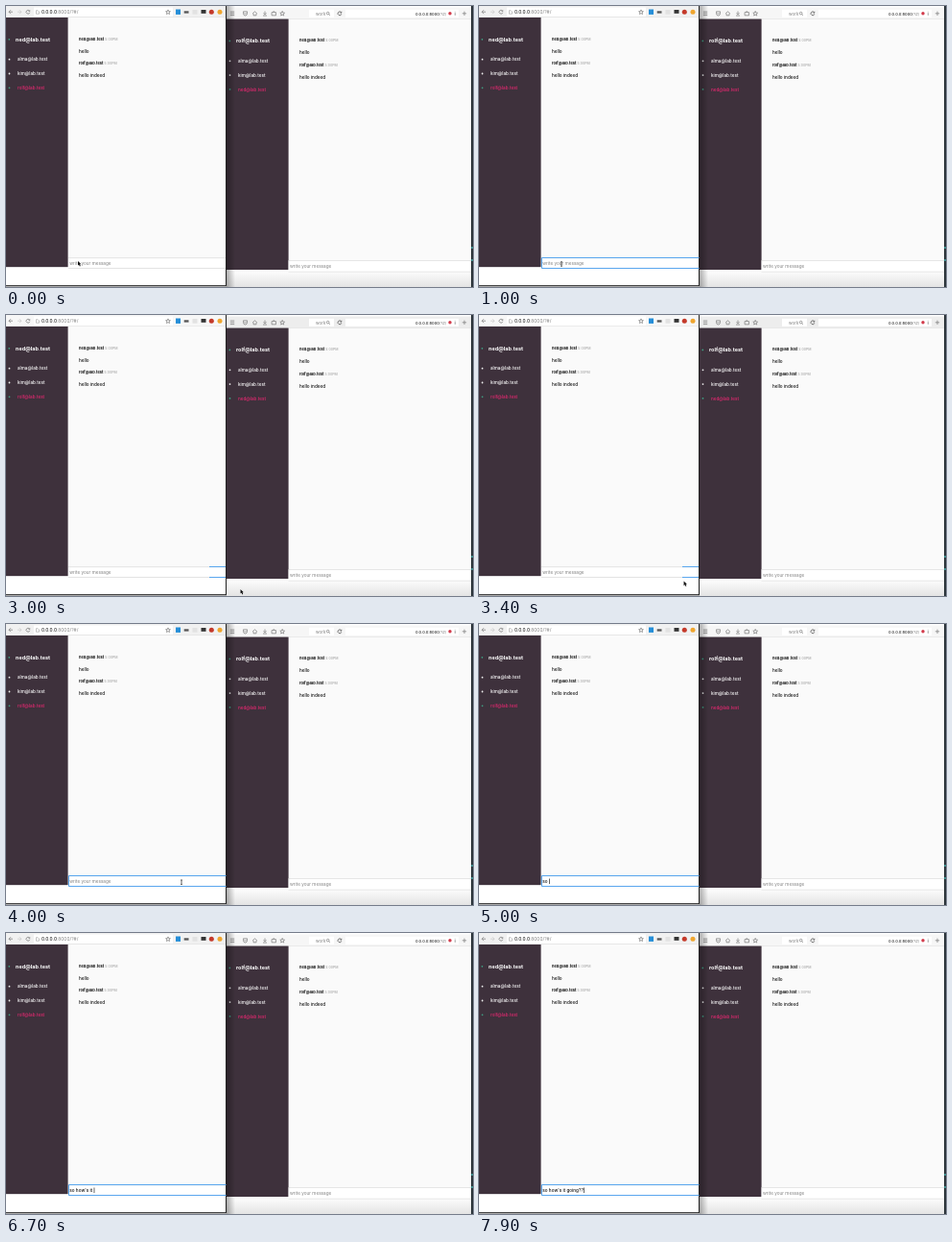
An HTML page with a canvas for the animation above (8000 ms loop, 487 by 293 pixels).

```html
<!DOCTYPE html>
<html lang="en">
<head>
<meta charset="utf-8">
<title>Chat in two windows</title>
<style>
html, body { margin: 0; width: 100%; height: 100%; overflow: hidden; background: #fff; }
canvas { display: block; width: 487px; height: 293px; }
</style>
</head>
<body>
<canvas id="stage"></canvas>
<script>
const W = 487, H = 293, LOOP = 8000;
const canvas = document.getElementById('stage');
const ratio = window.devicePixelRatio || 1;
canvas.width = W * ratio;
canvas.height = H * ratio;
const ctx = canvas.getContext('2d');
ctx.scale(ratio, ratio);

const DARK = '#3e313c', PINK = '#e52870', GREEN = '#3f9c80', GREY = '#808080', BLUE = '#5aa7ee';
const MESSAGE = "so how's it going??";
const KEY_TIMES = [4500, 4650, 4850, 5400, 5500, 5650, 5800, 5900, 6000, 6100,
  6200, 6600, 6900, 7050, 7200, 7300, 7400, 7600, 7800];
// Pointer stops: time, x, y
const PATH = [[0, 75, 266], [300, 75, 267], [500, 86, 269], [1900, 86, 269],
  [2250, 197, 280.5], [2400, 197, 280.5], [2800, 244.5, 286], [3150, 244.5, 286], [3650, 183, 269.2]];
const NED = 'ned@lab.test', ROLF = 'rolf@lab.test';

function rect(x, y, w, h, color) {
  ctx.fillStyle = color;
  ctx.fillRect(x, y, w, h);
}

function fade(x, y, w, h, from, to, vertical) {
  const gradient = ctx.createLinearGradient(x, y, vertical ? x : x + w, vertical ? y + h : y);
  gradient.addColorStop(0, from);
  gradient.addColorStop(1, to);
  rect(x, y, w, h, gradient);
}

// Laid out ten times larger and scaled down, so small letters keep their true spacing.
function text(str, x, y, size, color, weight = 400) {
  ctx.save();
  ctx.translate(x, y);
  ctx.scale(0.1, 0.1);
  ctx.font = `${weight} ${size * 10}px Inter, sans-serif`;
  ctx.fillStyle = color;
  ctx.fillText(str, 0, 0);
  const width = ctx.measureText(str).width / 10;
  ctx.restore();
  return width;
}

function dot(x, y, r, color) {
  ctx.fillStyle = color;
  ctx.beginPath();
  ctx.arc(x, y, r, 0, 7);
  ctx.fill();
}

function stroke(path, x, y, color = '#777', width = 0.7) {
  ctx.save();
  ctx.translate(x, y);
  ctx.strokeStyle = color;
  ctx.lineWidth = width;
  ctx.stroke(new Path2D(path));
  ctx.restore();
}

const STAR = 'M0-2.4L.7-.7 2.4-.6 1.1.5 1.5 2.2 0 1.3-1.5 2.2-1.1.5-2.4-.6-.7-.7Z';
const RELOAD = 'M1.5-1.1A1.9 1.9 0 1 0 1.8.5M1.8-2V-.7H.5';

function chat(x, y, bottom, owner, other) {
  rect(x, y, 64.6, bottom - y, DARK);
  dot(x + 3.3, y + 22.8, 0.9, GREEN);
  text(owner, x + 10, y + 24.7, 5.5, '#fff', 700);
  ['alma@lab.test', 'kim@lab.test', other].forEach((name, i) => {
    const rowY = y + 43.7 + i * 14.8;
    dot(x + 3.5, rowY, 0.9, i < 2 ? '#eee' : GREEN);
    text(name, x + 12, rowY + 1.7, 4.6, i < 2 ? '#fff' : PINK, 500);
  });
  [[NED, 'hello'], [ROLF, 'hello indeed']].forEach(([name, line], i) => {
    const rowY = y + 23.7 + i * 25.5;
    const width = text(name, x + 76, rowY, 4, '#111', 700);
    text('5:00PM', x + 77 + width, rowY, 3.6, '#999');
    text(line, x + 76, rowY + 13, 4.65, '#111', 500);
  });
}

function leftWindow(active) {
  if (active) fade(230, 0, 9, H, 'rgba(0,0,0,.3)', 'rgba(0,0,0,0)');
  rect(0, 0, 229, 12, active ? '#f1f1f1' : '#f7f7f7');
  rect(29, 1.5, 145, 9.5, '#fff');
  rect(0, 11.7, 229, 0.6, '#ccc');
  stroke('M2 0H-2M0-2L-2 0 0 2', 5, 6.2);
  stroke('M-2 0H2M0-2L2 0 0 2', 14, 6.2, '#c8c8c8');
  stroke(RELOAD, 23, 6.2);
  stroke('M-1.5-1.5H.2L1.5-.2V2H-1.5Z', 33, 6.2, '#888', 0.5);
  const width = text('0.0.0.0', 37, 8, 4.8, '#222', 500);
  text(':8000/?#/', 37 + width, 8, 4.8, GREY);
  stroke(STAR, 169, 6.3);
  rect(177, 3.5, 5, 5.4, '#258ed8');
  rect(185.7, 5.3, 4.8, 2.3, '#555');
  rect(194.5, 4, 5, 4.6, '#e2e2e2');
  rect(203.5, 4, 5, 3.8, '#333');
  dot(214.3, 6.2, 2.5, '#c4392a');
  dot(223, 6.2, 2.5, '#efa52e');
  rect(64.6, 12, 164.4, 261, '#fafafa');
  chat(0, 12, 272.4, NED, ROLF);
  rect(0, 272.4, 229, 19, '#fff');
  rect(65, 262, 164, 12, '#fff');
  rect(65, 262.5, 164, 0.6, '#d0d0d0');
  rect(65, 273.2, 164, 0.6, '#d0d0d0');
  rect(0, 291, 230, 1, '#444');
  rect(0, 292, 230, 1, '#aaa');
  rect(229, 0, 1, 292, '#222');
}

function rightWindow(active) {
  rect(230, 0, 255, 13.5, active ? '#ededed' : '#f6f6f6');
  rect(230, 0, 255, 1.5, '#fff');
  rect(316, 3.8, 26, 8, '#fff');
  rect(354, 3.8, 118, 8, '#fff');
  rect(230, 13, 255, 0.6, '#ccc');
  stroke('M-2.2-1.8H2.2M-2.2 0H2.2M-2.2 1.8H2.2', 236, 7.8);
  stroke('M-2-2H2V0Q2 2 0 2.2Q-2 2-2 0ZM-1-.6L0 .5 1-.6', 249.5, 7.8);
  stroke('M-2.3 0L0-2 2.3 0M-1.5 0V2H1.5V0', 259.5, 7.8);
  stroke('M0-2.3V1M-1.5-.5L0 1 1.5-.5M-2 2.2H2', 270, 7.8);
  stroke('M-2.2-1.2H2.2V2H-2.2ZM-.8-2H.8', 279.3, 7.8);
  stroke(STAR, 288.2, 7.8);
  text('work', 323, 9.5, 4.4, GREY);
  stroke('M1 0A1.3 1.3 0 1 0-1.6 0A1.3 1.3 0 1 0 1 0M.7 1L2 2.2', 336, 7.6);
  stroke(RELOAD, 348, 7.8, '#444');
  const width = text('0.0.0.0:8000', 427, 9.5, 4, '#222', 500);
  text('/?#/', 427 + width, 9.5, 4, GREY);
  dot(463, 7.8, 1.7, '#d23b4b');
  stroke('M0-.6V2M0-2V-1.4', 468.3, 7.8);
  stroke('M-2.2 0H2.2M0-2.2V2.2', 478, 7.8);
  rect(294, 13.6, 191, 262, '#fafafa');
  chat(230, 13.6, 275, ROLF, NED);
  fade(230, 275, 255, 18, '#fff', '#e4e4e4', true);
  rect(294.6, 265.5, 190.4, 11.5, '#fff');
  rect(294.6, 265.3, 190.4, 0.6, '#d8d8d8');
  rect(294.6, 276.8, 190.4, 0.6, '#d8d8d8');
  text('write your message', 296, 273.3, 4.65, GREY);
  rect(485, 0, 2, 293, '#2c353b');
  rect(485, 251, 2, 2, '#3d8b8b');
  rect(485, 264, 2, 2, '#3d8b8b');
}

function drawInput(t, focused) {
  const typed = MESSAGE.slice(0, KEY_TIMES.filter(k => k <= t).length);
  const width = typed
    ? text(typed, 66.3, 270.2, 4.65, '#111', 500)
    : text('write your message', 66.3, 270.2, 4.65, GREY);
  if (focused) {
    stroke('M164 0H0V11H164', 65.5, 262.5, BLUE, 1);
    if (typed || t % 1000 >= 200 && t % 1000 < 700) {
      rect(66.2 + (typed ? width + 0.3 : 0), 265.5, 0.7, 5.6, '#222');
    }
  } else if (t >= 2800) {
    rect(212, 262, 17, 1, BLUE);
    rect(212, 273, 17, 1, BLUE);
  }
}

function pointerAt(t) {
  const next = PATH.findIndex(p => p[0] > t);
  if (next < 0) return PATH[PATH.length - 1].slice(1);
  const [t0, x0, y0] = PATH[next - 1], [t1, x1, y1] = PATH[next];
  const u = (t - t0) / (t1 - t0), ease = u * u * (3 - 2 * u);
  return [x0 + (x1 - x0) * ease, y0 + (y1 - y0) * ease];
}

function drawPointer(t) {
  if (t >= KEY_TIMES[0]) return;
  const [x, y] = pointerAt(t);
  if (t >= 500 && x < 229 && y > 262 && y < 274) {
    stroke('M-1-2.4Q0-2.4 0-1.8V1.8Q0 2.4 1 2.4M1-2.4Q0-2.4 0-1.8M0 1.8Q0 2.4-1 2.4', x, y, '#222', 0.7);
    return;
  }
  ctx.save();
  ctx.translate(x, y);
  const arrow = new Path2D('M0 0V4.6L1.1 3.7 1.9 5.4 2.8 5 2 3.3H3.4Z');
  ctx.strokeStyle = '#fff';
  ctx.lineWidth = 0.7;
  ctx.stroke(arrow);
  ctx.fillStyle = '#111';
  ctx.fill(arrow);
  ctx.restore();
}

function draw(now) {
  const t = now % LOOP;
  const leftActive = t < 2800 || t >= 3650;
  rect(0, 0, W, H, '#fff');
  rightWindow(!leftActive);
  leftWindow(leftActive);
  drawInput(t, leftActive && t >= 300);
  drawPointer(t);
  requestAnimationFrame(draw);
}
requestAnimationFrame(draw);
</script>
</body>
</html>
```
